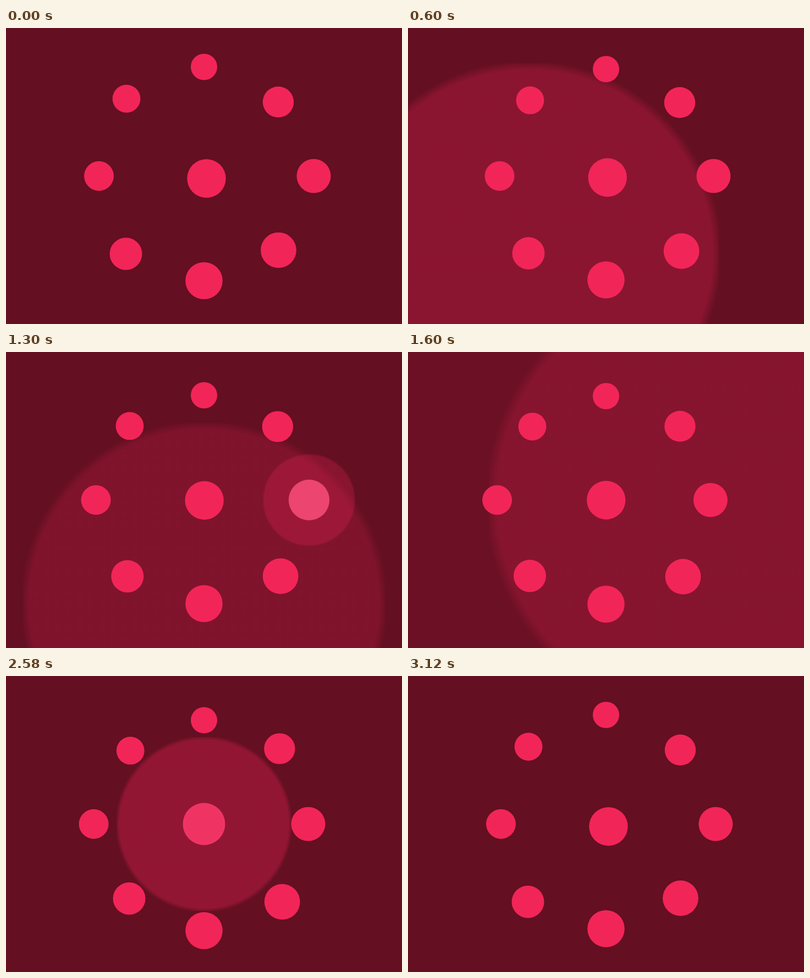
These frames come from a looping animation (720x540 px, 3.14 s). An HTML page with a canvas:

```html
<!DOCTYPE html>
<html lang="en">
<head>
<meta charset="utf-8">
<title>Pulsing dots</title>
<style>
  html, body { margin: 0; width: 100%; height: 100%; overflow: hidden; background: #640f22; }
  canvas { display: block; }
</style>
</head>
<body>
<canvas id="stage" width="720" height="540"></canvas>
<script>
const ctx = document.getElementById('stage').getContext('2d');
const LOOP = 3140, STEP = 20;
const BACK = '#640f22';
const BASE = [242, 37, 88], LIT = [235, 77, 117];

// Drift: distance travelled along (dx, dy) at each of these times
const TIMES = [0, 600, 940, 1300, 1600, 2580, LOOP];
const drift = (...d) => TIMES.map((t, i) => [t, i && i < 6 ? d[i - 1] : 0]);
const UPPER = drift(4, 6, 8, 9.5, 9.7);
const INWARD = drift(4, 6.5, 8.5, 9.5, 10);

// pulse: start time, gain: strength of its ripple
const dots = [
  { x: 360, y: 71, r: 24, dx: 0, dy: 1, path: UPPER },
  { x: 219, y: 129, r: 25.4, dx: .74, dy: .74, path: UPPER },
  { x: 495, y: 135, r: 28.2, dx: -1, dy: 1, path: drift(1, 1.4, 1.1, .5, -2.4) },
  { x: 169, y: 270, r: 27, dx: -1, dy: 0, path: drift(2.5, 4, 5.5, 6.9, 9.5) },
  { x: 364.5, y: 274.5, r: 35.2, dx: -.45, dy: -.45, path: INWARD, pulse: 2240, gain: 1 },
  { x: 559.5, y: 270, r: 31, dx: -1, dy: 0, path: INWARD, pulse: 1045, gain: 1.1 },
  { x: 218, y: 412, r: 29.5, dx: 1, dy: -1, path: drift(1, 2, 2.8, 3.5, 6), pulse: 96, gain: 1.25 },
  { x: 495.5, y: 405.3, r: 32.4, dx: 1, dy: 1, path: drift(1.7, 2.6, 3.7, 4.6, 6.7) },
  { x: 360, y: 461, r: 33.8, dx: 0, dy: 1, path: drift(-1.5, -2, -2, -1, 3.5), pulse: 811, gain: .85 }
];

// Age of a pulse in ms against ripple radius and opacity
const LIFE = 840;
const RADIUS = [[0, 28], [129, 49], [255, 84], [340, 159], [460, 296], [555, 403], [790, 612], [LIFE, 640]];
const ALPHA = [[0, 0], [129, .09], [255, .23], [340, .32], [504, .215], [555, .18], [789, .065], [LIFE, 0]];

// Smooth curve through points, level at both ends
function curve(pts, t) {
  const last = pts.length - 1;
  if (t <= pts[0][0]) return pts[0][1];
  if (t >= pts[last][0]) return pts[last][1];
  let i = 0;
  while (t > pts[i + 1][0]) i++;
  const gap = k => pts[k + 1][0] - pts[k][0];
  const slope = k => (pts[k + 1][1] - pts[k][1]) / gap(k);
  const tangent = k => k === 0 || k === last ? 0 :
    (slope(k - 1) * gap(k) + slope(k) * gap(k - 1)) / (gap(k) + gap(k - 1));
  const h = gap(i), u = (t - pts[i][0]) / h, v = 1 - u;
  return pts[i][1] * (1 + 2 * u) * v * v + pts[i + 1][1] * u * u * (3 - 2 * u) +
    h * u * v * (v * tangent(i) - u * tangent(i + 1));
}

function smooth(a, b, t) {
  const u = Math.min(1, Math.max(0, (t - a) / (b - a)));
  return u * u * (3 - 2 * u);
}

const flash = age => smooth(0, 150, age) * (1 - smooth(170, 460, age));

function drawRipple(x, y, age, gain) {
  const r = curve(RADIUS, age), a = curve(ALPHA, age) * gain;
  const outer = r * 1.016;
  const fill = ctx.createRadialGradient(x, y, r * .965, x, y, outer);
  fill.addColorStop(0, `rgba(${BASE},${a})`);
  fill.addColorStop(1, `rgba(${BASE},0)`);
  ctx.save();
  // The soft rim is cut flat by the ripple's own square
  ctx.beginPath();
  ctx.rect(x - r, y - r, 2 * r, 2 * r);
  ctx.clip();
  ctx.fillStyle = fill;
  ctx.beginPath();
  ctx.arc(x, y, outer, 0, Math.PI * 2);
  ctx.fill();
  ctx.restore();
}

function draw(t) {
  ctx.fillStyle = BACK;
  ctx.fillRect(0, 0, 720, 540);
  const now = dots.map(d => {
    const m = curve(d.path, t);
    return { x: d.x + d.dx * m, y: d.y + d.dy * m, r: d.r, gain: d.gain,
      age: d.pulse === undefined ? -1 : t - d.pulse };
  });
  for (const d of now) {
    if (d.age > 0 && d.age < LIFE) drawRipple(d.x, d.y, d.age, d.gain);
  }
  for (const d of now) {
    const k = flash(d.age);
    const rgb = BASE.map((c, i) => Math.round(c + (LIT[i] - c) * k));
    ctx.fillStyle = `rgb(${rgb})`;
    ctx.beginPath();
    ctx.arc(d.x, d.y, d.r * (1 + .25 * k), 0, Math.PI * 2);
    ctx.fill();
  }
}

const start = performance.now();
function tick() {
  const t = (performance.now() - start) % LOOP;
  draw(Math.floor(t / STEP) * STEP);
  requestAnimationFrame(tick);
}
tick();
</script>
</body>
</html>
```
